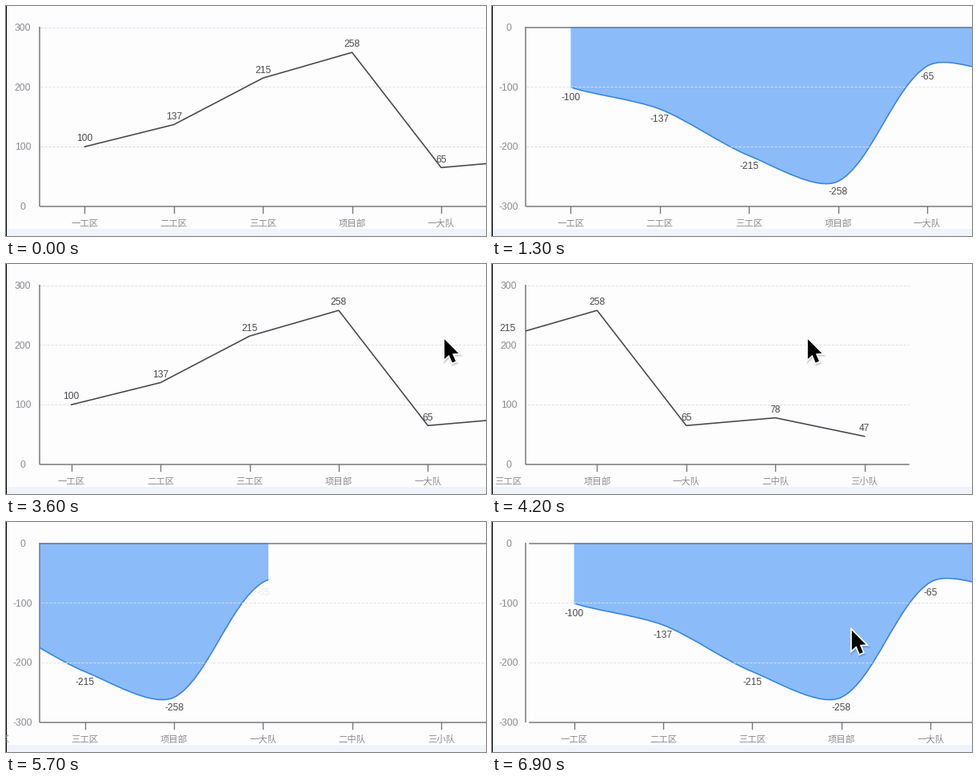
Recreate the animation shown at these times as a matplotlib script. Size 600x288 px, loop 7000 ms.

```python
import numpy as np
import matplotlib.pyplot as plt
from matplotlib.animation import FuncAnimation
from matplotlib.patches import PathPatch, Polygon, Rectangle
from matplotlib.path import Path

W, H, DPI = 600, 288, 100
FRAMES, INTERVAL = 70, 100
PT = 72 / DPI                       # points per pixel

LEFT, TOP, BOTTOM = 42.7, 26.7, 250.9
STEP = 111.4
NAMES = ["一工区", "二工区", "三工区", "项目部", "一大队", "二中队", "三小队"]
VALUES = np.array([100, 137, 215, 258, 65, 78, 47])
XS = LEFT + STEP * (np.arange(7) + 0.5)
TOTAL = STEP * 7
MAX_SCROLL = LEFT + TOTAL - W
UNIT = (BOTTOM - TOP) / 300

BG, STRIP = "#fefdfe", "#f0f4fa"
AXIS, GRID = "#77777c", "#dfdde6"
LABEL, TEXT = "#8b8b90", "#48484b"
DARK, BLUE = "#47464b", "#2b86f5"
AREA = "#1a7df5"
LATIN, CJK = "Liberation Sans", "Noto Sans CJK JP"

SPEED = 86                          # reveal, pixels per frame
REVEAL_STARTS = [(51, 51.1), (26, 25.5), (1, 1.42), (0, -20)]
ARROW = np.array([(0, 0), (0, 25.5), (5.8, 20.2), (10, 30.3), (14.4, 28.4),
                  (10.2, 18.6), (18, 18.2)])

fig = plt.figure(figsize=(W / DPI, H / DPI), dpi=DPI, facecolor=BG)
ax = fig.add_axes([0, 0, 1, 1])
ax.set(xlim=(0, W), ylim=(H, 0))
ax.axis("off")


def box(x0, x1):
    """Full-height clip rectangle between two x positions."""
    return Rectangle((x0, -5), max(x1 - x0, 0), H + 10, transform=ax.transData)


PLOT = box(LEFT - 0.7, W)


def line(xs, ys, color, width, clip=None, **kw):
    item, = ax.plot(xs, ys, color=color, lw=width * PT, **kw)
    if clip:
        item.set_clip_path(clip)


def text(x, y, s, size, color, font=LATIN, clip=None, alpha=1):
    item = ax.text(x, y + 4.3, s, ha="center", va="baseline", color=color,
                   fontsize=size * PT, family=font, alpha=alpha)
    if clip:
        item.set_clip_path(clip)


def smooth_path(pts, k=0.3):
    """Bezier spline whose handles follow the length of each neighbour segment."""
    verts = [pts[0]]
    handle = pts[0] + (18, 8)
    for i in range(1, len(pts)):
        p, after = pts[i], pts[min(i + 1, len(pts) - 1)]
        v = after - pts[i - 1]
        prev_len = np.hypot(*(p - pts[i - 1]))
        next_len = np.hypot(*(after - p))
        ratio = next_len / (next_len + prev_len)
        before = p - v * k * (1 - ratio) if i < len(pts) - 1 else p
        verts += [handle, before, p]
        handle = p + v * k * ratio
    return verts, [Path.MOVETO] + [Path.CURVE4] * (len(verts) - 1)


def scroll_at(f):
    if f < 35:
        return 0
    if f <= 42:
        u = (f - 35) / 7
        return (MAX_SCROLL + 78.7) * u * u * (3 - 2 * u)
    if f < 49:                      # spring back from the overscroll
        t = f - 42
        return MAX_SCROLL + 78.7 * (1 + t) * np.exp(-t)
    if f <= 62:
        return MAX_SCROLL
    return np.interp(f, range(62, 70),
                     [MAX_SCROLL, 203.5, 140, 60, -8, -24, -12, -4.2])


def cursor_at(f, scroll):
    if f == 34:
        return 520, 1
    if 35 <= f <= 42:
        return max(394, 564 - scroll), 93
    if 43 <= f <= 46:
        return 394 - 1.4 * (f - 43) ** 2, 93 - 10 * (f - 43) ** 2
    if f == 60:
        return 215, 18
    if f == 61:
        return 238, 120
    if f >= 62:
        return min(449, 464.5 - scroll), 134.5
    return None


def draw_axes(negative, shift):
    x0, x1 = LEFT - shift, LEFT + TOTAL - shift
    for i in range(4):
        y = TOP + 100 * UNIT * i
        value = -100 * i if negative else 300 - 100 * i
        text(21, y, str(value), 12.2, LABEL)
        if i < 3 and not (negative and i == 0):
            line([x0, x1], [y, y], GRID, 1, PLOT, dashes=(3, 2))
    if negative:
        line([x0, x1], [TOP, TOP], AXIS, 1.5, PLOT)
    line([x0, x1], [BOTTOM, BOTTOM], AXIS, 1.5, PLOT)
    for x, name in zip(XS - shift, NAMES):
        line([x, x], [BOTTOM, BOTTOM + 8], AXIS, 1.4, PLOT)
        text(x, 271.8, name, 11.4, LABEL, CJK, PLOT)
    line([42.3, 42.3], [TOP - 0.5, BOTTOM], AXIS, 1.5,
         solid_capstyle="butt")


def draw_series(negative, shift, shown):
    clip = box(LEFT - 0.7, max(LEFT + shown - shift, LEFT - 0.7))
    xs = XS - shift
    ys = TOP + VALUES * UNIT if negative else BOTTOM - VALUES * UNIT
    if negative:
        verts, codes = smooth_path(np.column_stack([xs, ys]))
        closed = Path(verts + [(xs[-1], TOP - 0.5), (xs[0], TOP - 0.5), verts[0]],
                      codes + [Path.LINETO, Path.LINETO, Path.CLOSEPOLY])
        fill = PathPatch(closed, fc=AREA, ec="none", alpha=0.5)
        edge = PathPatch(Path(verts, codes), fc="none", ec=BLUE, lw=1.6 * PT)
        for patch in (fill, edge):
            ax.add_patch(patch)
            patch.set_clip_path(clip)
    else:
        line(xs, ys, DARK, 1.6, clip, solid_joinstyle="bevel")
    for x, y, v, home in zip(xs, ys, VALUES, XS):
        alpha = np.clip((shown - (home - LEFT)) / 60, 0, 1)
        if alpha > 0:
            s, dy = (f"-{v}", 12) if negative else (str(v), -11)
            text(x, y + dy, s, 12, TEXT, clip=PLOT, alpha=alpha)


def draw_cursor(tip):
    pts = ARROW * 0.97 + tip + (0.8, 1.2)
    for grow, alpha in ((5, 0.06), (3, 0.1)):
        ax.add_patch(Polygon(pts + (0.8, 2), fc="black", ec="black",
                             lw=grow * PT, alpha=alpha, zorder=8))
    ax.add_patch(Polygon(pts, fc="white", ec="white", lw=3.4 * PT, zorder=9))
    ax.add_patch(Polygon(pts, fc="black", ec="none", zorder=10))


def update(f):
    for item in [*ax.lines, *ax.patches, *ax.texts]:
        item.remove()
    negative = 1 <= f < 26 or f >= 51
    start = next(s for first, s in REVEAL_STARTS if f >= first)
    shift = scroll_at(f)
    ax.add_patch(Rectangle((0, 279), W, 10, fc=STRIP, ec="none"))
    ax.add_patch(Rectangle((0, 0), 1, H, fc="black", ec="none"))
    draw_axes(negative, shift)
    draw_series(negative, shift, SPEED * max(f - start, 0))
    tip = cursor_at(f, shift)
    if tip:
        draw_cursor(tip)
    return []


anim = FuncAnimation(fig, update, frames=FRAMES, interval=INTERVAL,
                     init_func=lambda: [], repeat=True, repeat_delay=0)
plt.show()
```
